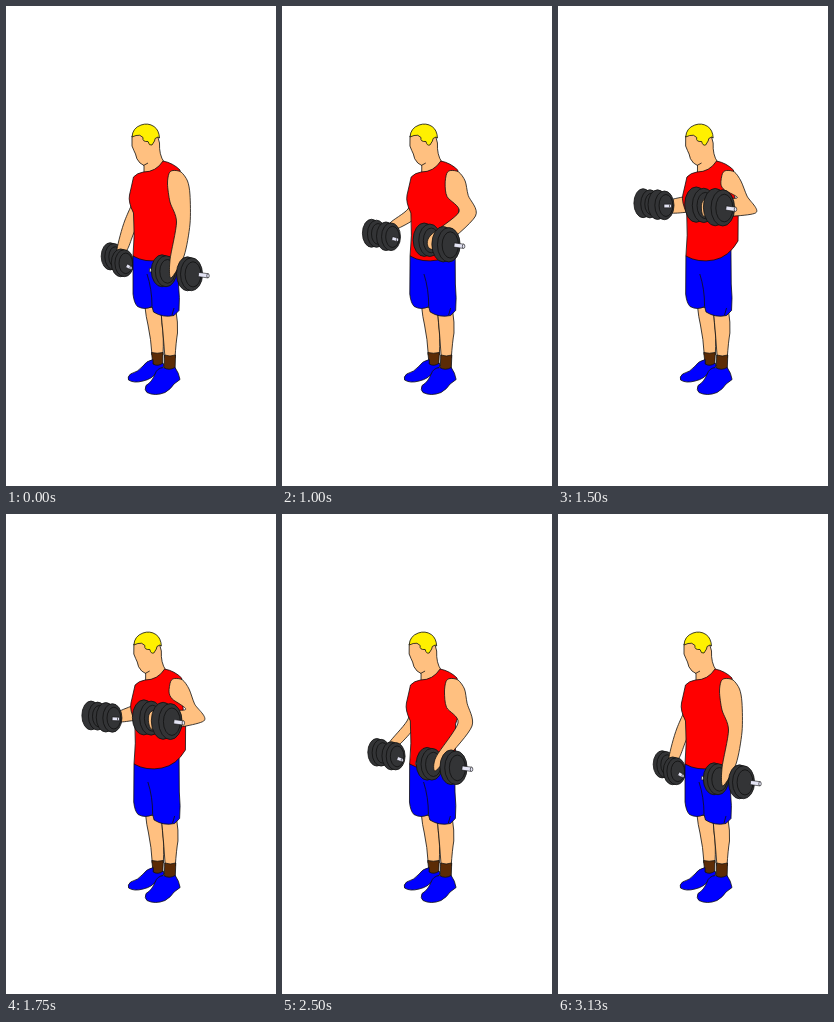
An HTML page for the animation above (3260 ms loop, 270x480 px).

```html
<!DOCTYPE html>
<html lang="en">
<head>
<meta charset="utf-8">
<title>Dumbbell curl</title>
<style>
html, body { margin: 0; width: 100%; height: 100%; overflow: hidden; background: #fff; }
svg { display: block; width: 100%; height: 100%; }
path, ellipse { stroke: #111; stroke-width: .8; stroke-linejoin: round; }
.skin { fill: #ffc080; }
.red { fill: #f00; }
.blue { fill: #00f; }
.hair { fill: #fff000; }
.sock { fill: #5c2c06; }
.iron { fill: #333436; }
.bar { fill: #e4e4f4; stroke-width: .6; }
.line { fill: none; }
</style>
</head>
<body>
<svg viewBox="0 0 270 480">
  <g id="farArm"></g>
  <g id="body">
    <path class="skin" d="M139 301Q140 311 142 319Q145 333 146 349L157 349Q158 331 156 318L155 302Z"/>
    <path class="skin" d="M155 306Q156 317 157 327L159 352L169 352Q170 336 171.500 327Q172 316 170 305Z"/>
    <path class="sock" d="M145.500 346.500Q151 348 157 346.500L156.500 361L147 359Z"/>
    <path class="blue" d="M147 353.500Q140 355 137 360Q132 366 124.500 368Q121 371 122.500 374Q128 377.500 137 375Q146 373 150 367L158 360L157 357Q152 361 147 358Z"/>
    <path class="sock" d="M158.500 349Q164 351 169.500 349L169 365L158 364Z"/>
    <path class="blue" d="M157.500 361.500Q151 362 149 368Q146 376 140 379.500Q138 384 141 386.500Q149 390.500 159 386.500Q165 383 168 378L174 373.500Q173 367 169 361.500Q163 365 157.500 361.500Z"/>
    <path class="blue" d="M127 250L127 288Q128 297 131.500 300.500Q139 304.500 146 300.500L147.500 306Q157 312 168 309.500L173 304.500Q174 292 172.500 278L172 244Z"/>
    <path class="line" d="M141 268Q146 283 146 300.500M166 309L168 302"/>
    <path class="skin" d="M126 130L126 140Q128 145 129.500 148Q130 153 134 157L138 159.500L138 167Q150 172 158 156Q153 149 153.500 137L150 124L134 122Z"/>
    <path class="line" d="M137.500 159.500L142 157"/>
    <path class="red" id="shirt"/>
    <path class="hair" d="M126 131Q126.500 122 135 119Q142 116.500 148 120.500Q153 124 153.500 132L152 131Q148 132 148.500 135L146 139Q143 140 142 135.500Q136 136 137 131.500Q134 128 130 129.500Z"/>
  </g>
  <g id="nearArm"></g>
</svg>
<script>
const LOOP = 3260, HOLD = 12.5;
const KNOTS = [0, 4, 8, 12, 16, 20, 25];

// Each track holds x,y pairs at the knots; the last knot repeats the first.
const near = {
  left:  [158,265, 153,260, 145,234, 142,199, 142,217, 147.5,250],
  right: [183.5,268, 178.5,263, 164,238.5, 161,201.5, 162,221.5, 171.5,253.5],
  inner: [170.5,216, 173,213, 177,206, 179,192, 179,202, 176,209],
  outer: [184,218, 187,213, 193.5,210, 197.5,207, 196.5,208, 190,212],
  wristA: [164,254, 160,250, 148,230, 147,193, 146,210, 154,243],
  wristB: [178,250, 172,249, 160,241, 152,211, 155,227, 166,243],
  tip:   [165,272, 159,267, 147,242, 144,207, 144,224, 153,257]
};
const far = {
  left:  [106,250.5, 101,246.5, 92,227.5, 88.5,197.5, 89.5,213, 97,238.5],
  right: [116.5,257, 114.5,252, 106.5,230.5, 103,199, 104.5,215.5, 111.5,242],
  outer: [119,214, 123,211, 126,203, 128,190, 127,195, 125,207],
  inner: [127,229, 129,223, 131,214, 131,206, 131,208, 130,217],
  wristA: [111,243, 107,238, 108,217, 113,194, 112,207, 107,229],
  wristB: [121,244, 117,239, 117,222, 114,207, 117,213, 116,232]
};
const lean = [0, .6, 2, 1.7, 2, 1.2];

const $ = id => document.getElementById(id);
const fix = n => n.toFixed(2);

function add(parent, tag, cls) {
  const el = document.createElementNS("http://www.w3.org/2000/svg", tag);
  el.setAttribute("class", cls);
  return parent.appendChild(el);
}

function set(el, attrs) {
  for (const k in attrs) el.setAttribute(k, attrs[k]);
}

// Hermite interpolation with resting ends
function sample(v, k) {
  const n = KNOTS.length - 1;
  const at = i => v[i % n];
  const slope = i => i === 0 || i === n ? 0 :
    (at(i + 1) - at(i - 1)) / (KNOTS[i + 1] - KNOTS[i - 1]);
  let i = 0;
  while (i < n - 1 && k >= KNOTS[i + 1]) i++;
  const h = KNOTS[i + 1] - KNOTS[i], u = (k - KNOTS[i]) / h;
  const s = u * u * (3 - 2 * u);
  return at(i) * (1 - s) + at(i + 1) * s +
    h * u * (1 - u) * ((1 - u) * slope(i) - u * slope(i + 1));
}

function pose(tracks, k) {
  const out = {};
  for (const name in tracks) {
    out[name] = [0, 1].map(c => sample(tracks[name].filter((_, i) => i % 2 === c), k));
  }
  return out;
}

// Smooth closed outline through points
function blob(p) {
  const n = p.length, at = i => p[(i + n) % n], w = .14;
  let d = "M" + p[0].map(fix);
  for (let i = 0; i < n; i++) {
    const [a, b, c, e] = [at(i - 1), at(i), at(i + 1), at(i + 2)];
    const c1 = b.map((v, j) => fix(v + (c[j] - a[j]) * w));
    const c2 = c.map((v, j) => fix(v - (e[j] - b[j]) * w));
    d += "C" + c1 + " " + c2 + " " + c.map(fix);
  }
  return d + "Z";
}

function makeArm(root) {
  const disc = () => [0, 1, 2].map(() => add(root, "ellipse", "iron"));
  const arm = {};
  arm.grip = add(root, "path", "bar");
  arm.left = disc();
  arm.limb = add(root, "path", "skin");
  arm.right = disc();
  arm.stub = add(root, "path", "bar");
  arm.cap = add(root, "ellipse", "bar");
  return arm;
}

function drawPlates(discs, [x, y], rx, ry, gap) {
  const parts = [[-gap, 1, 1], [gap, 1, .97], [gap + 1.5, .72, .74]];
  discs.forEach((el, i) => {
    const [dx, sx, sy] = parts[i];
    set(el, { cx: fix(x + dx), cy: fix(y + dx * .1), rx: fix((rx - gap) * sx), ry: fix(ry * sy) });
  });
}

function rod(el, a, b, r) {
  const len = Math.hypot(b[0] - a[0], b[1] - a[1]);
  const nx = (a[1] - b[1]) / len * r, ny = (b[0] - a[0]) / len * r;
  const pts = [[a[0] + nx, a[1] + ny], [b[0] + nx, b[1] + ny],
    [b[0] - nx, b[1] - ny], [a[0] - nx, a[1] - ny]];
  set(el, { d: "M" + pts.map(q => q.map(fix)).join("L") + "Z" });
}

function drawStub(arm, a, b, r) {
  rod(arm.stub, a, b, r);
  set(arm.cap, { cx: fix(b[0]), cy: fix(b[1]), rx: fix(r * .6), ry: r });
}

const nearArm = makeArm($("nearArm")), farArm = makeArm($("farArm"));

function draw(ms) {
  const k = Math.min(25, Math.floor(Math.floor(ms / 10) / HOLD));
  const n = pose(near, k), f = pose(far, k);
  const lift = (268 - n.right[1]) / 66.5;
  const tilt = sample(lean, k) / 260;
  const onBody = (x, y) => [x + tilt * (390 - y), y];

  $("body").setAttribute("transform", `matrix(1 0 ${-tilt} 1 ${tilt * 390} 0)`);
  const hem = 171 + 8 * lift;
  set($("shirt"), { d: "M137.500 166Q150 166 157 155Q167 157 174 164L176 200" +
    `L${fix(hem)} 210L${fix(hem)} ${fix(246 - 11 * lift)}Q${fix(166 + 4 * lift)} 251 155 254` +
    "Q139 257 127 250Q129 230 127.500 207Q122 196 123.500 189Q126 178 127.500 171Q131 167 137.500 166Z" });

  // near arm
  set(nearArm.limb, { d: blob([
    onBody(167, 164.5), onBody(175, 166), onBody(181.5, 175),
    [184 + 5 * lift, 189 + lift], n.outer, n.wristB, n.tip, n.wristA, n.inner,
    [164 + 2.5 * lift, 196 - 12 * lift], onBody(161.5, 178), onBody(163, 167.5)]) });
  const rx = 12.7 + 2.6 * lift, ry = 16.5 + 1.7 * lift, gap = 2 + 1.8 * lift;
  drawPlates(nearArm.left, n.left, rx, ry - .5, gap);
  drawPlates(nearArm.right, n.right, rx + .3, ry + .5, gap);
  const [x, y] = n.right;
  rod(nearArm.grip, [n.left[0] - 14.5 + 2.5 * lift, n.left[1] - 1], n.right, 1.8);
  drawStub(nearArm, [x + 9 - 2 * lift, y + .5], [x + 18.5 - 2 * lift, y + 1.8], 2.1);

  // far arm
  set(farArm.limb, { d: blob([
    [134, 184], f.outer, f.wristA,
    [f.wristA[0] + 2, f.wristA[1] + 7], f.wristB, f.inner, [136, 205]]) });
  const fx = 11.2 + 1.8 * lift, fy = 13.6 + .9 * lift;
  drawPlates(farArm.left, f.left, fx - .4, fy, gap * .9);
  drawPlates(farArm.right, f.right, fx, fy + .3, gap * .9);
  rod(farArm.grip, f.left, f.right, 1.5);
  const [u, v] = f.right, drop = 1 - lift;
  drawStub(farArm, [u + 4 - lift, v + 1 + 1.6 * drop], [u + 8.5 + lift, v + 1 + 4 * drop], 1.8);
}

function tick(now) {
  draw(now % LOOP);
  requestAnimationFrame(tick);
}
draw(0);
requestAnimationFrame(tick);
</script>
</body>
</html>
```
